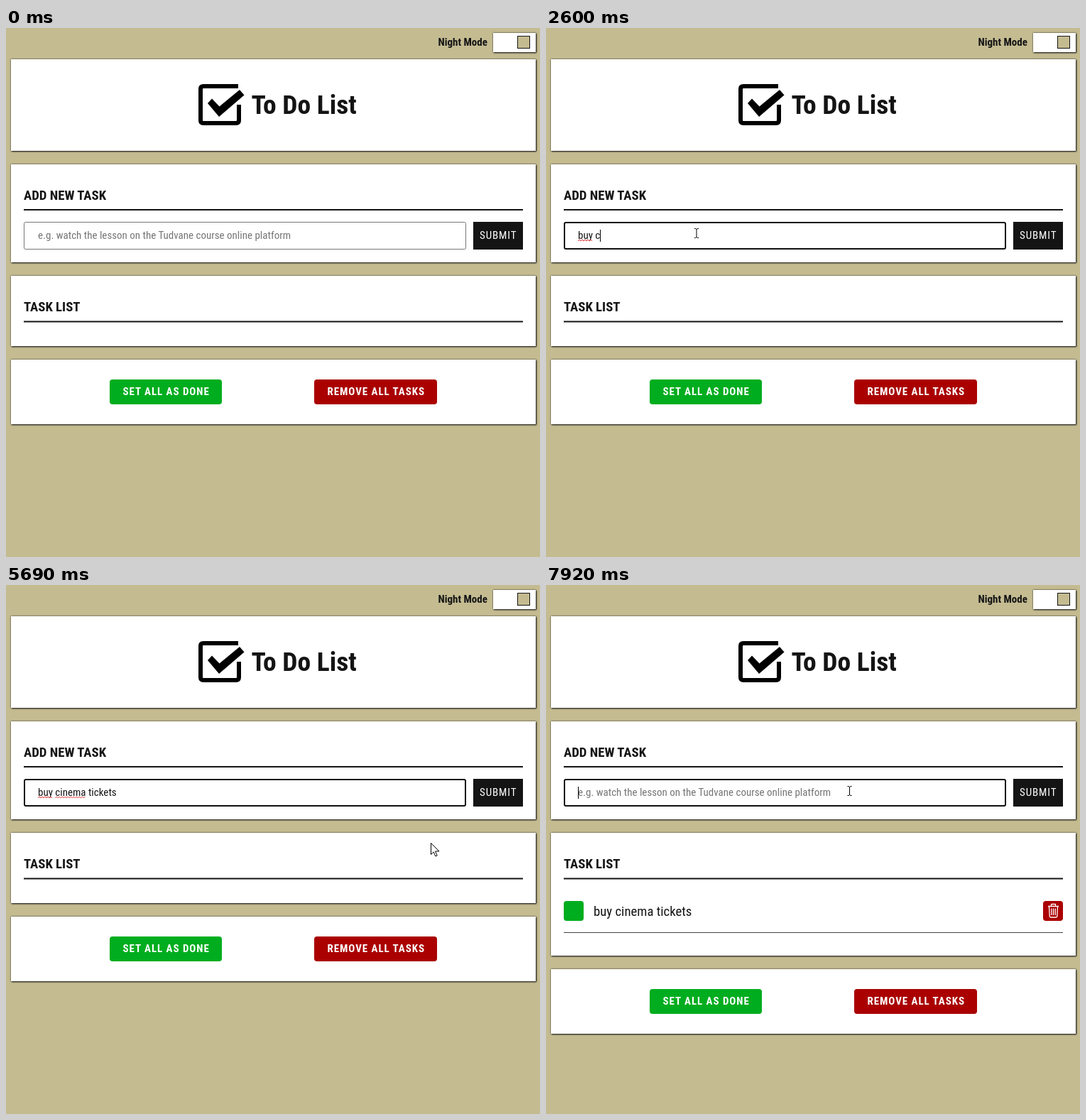
An HTML page that plays this animation: 752 px wide and 745 px high, repeating every 8 s.

```html
<!DOCTYPE html>
<html lang="en">
<head>
<meta charset="utf-8">
<title>To Do List</title>
<style>
  html, body { margin: 0; width: 100%; height: 100%; overflow: hidden; background: #c4bb91; }
  .card {
    position: absolute; left: 7px; width: 739px; background: #fff;
    box-shadow: 0 0 2px #141414cc, 1px 1px 2px #141414;
  }
  svg { position: absolute; left: 0; top: 0; }
  text {
    font: 15px "Roboto Condensed", Roboto, "Liberation Sans", sans-serif;
    font-stretch: 75%; fill: #141414; white-space: pre;
  }
  .bold { font-weight: 700; }
  .h1 { font-size: 37.5px; font-weight: 700; }
  .h2 { font-size: 18.75px; font-weight: 700; }
  .task { font-size: 18.75px; }
  .hint { fill: #757575; }
  .button { font-weight: 700; letter-spacing: .94px; fill: #fff; }
  .submit { letter-spacing: .9px; fill: #fff; }
  .submit.dark { font-weight: 700; fill: #141414; }
</style>
</head>
<body>
<div class="card" style="left:686px;width:60px;top:7px;height:27px"></div>
<div class="card" style="top:44px;height:129px"></div>
<div class="card" style="top:192px;height:138px"></div>
<div class="card" id="listCard" style="top:349px;height:99px"></div>
<div class="card" id="actionCard" style="top:467px;height:91px"></div>

<svg width="752" height="745" viewBox="0 0 752 745">
  <text class="bold" x="608.5" y="25">Night Mode</text>
  <rect x="720.5" y="11.5" width="17" height="17" fill="#c4bb91" stroke="#141414"/>

  <path d="M327 82H278q-4 0-4 4v44q0 4 4 4h46q4 0 4-4V108" fill="none" stroke="#000" stroke-width="6"/>
  <path d="M284 106l6-6.5 10.500 11L329 87l6.500 7.500L300 125z"/>
  <text class="h1" x="345.500" y="121">To Do List</text>

  <text class="h2" x="25" y="241.500">ADD NEW TASK</text>
  <path d="M25 256H728M25 413.500H728" stroke="#141414" stroke-width="2"/>
  <text class="h2" x="25" y="399">TASK LIST</text>

  <rect id="field" fill="#fff"/>
  <text class="hint" id="hint" x="45" y="297">e.g. watch the lesson on the Tudvane course online platform</text>
  <text id="typed" x="45" y="297"></text>
  <path id="squiggles" fill="none" stroke="#e03030"/>
  <rect id="caret" y="284" width="1" height="17" fill="#000"/>

  <g id="submitNormal">
    <rect x="658" y="273" width="70" height="39" fill="#141414"/>
    <text class="submit" x="667" y="297">SUBMIT</text>
  </g>
  <g id="submitHover">
    <rect id="submitBox" x="657.500" y="273.500" width="70" height="38" fill="#fff" stroke="#141414"/>
    <text class="submit dark" x="665" y="297">SUBMIT</text>
  </g>

  <g id="taskRow">
    <rect x="25" y="445" width="28" height="28" rx="4" fill="#00ad1f"/>
    <text class="task" x="67" y="465.500">buy cinema tickets</text>
    <rect x="700" y="445" width="28" height="28" rx="4" fill="#aa0000"/>
    <path d="M707 452.500H722M711.500 452v-2q0-.5.500-.5h5q.500 0 .500.500v2M708.500 453l.700 13.500q.100 1.500 1.500 1.500h7.600q1.400 0 1.500-1.500l.700-13.500M711.800 455.500v9.500M714.500 455.500v9.500M717.200 455.500v9.500"
      fill="none" stroke="#fff" stroke-width="1.300"/>
    <path d="M25 489.500H728" stroke="#444"/>
  </g>

  <g id="actions">
    <rect x="146" y="495" width="158" height="35" rx="4" fill="#00ad1f"/>
    <text class="button" x="164.500" y="517">SET ALL AS DONE</text>
    <rect x="434" y="495" width="173" height="35" rx="4" fill="#aa0000"/>
    <text class="button" x="452.500" y="517">REMOVE ALL TASKS</text>
  </g>

  <circle id="click" r="11.500" fill="#fff000" opacity=".6"/>
  <g id="pointer">
    <path id="arrow" d="M.500.500V16.500l3.700-3.500 2.600 6 2.400-1-2.600-6h5.400z" fill="#fff" stroke="#000"/>
    <path id="ibeam" d="M-3-6.500H-1.500L0-5.500 1.500-6.500H3M0-5.500V5.500M-3 6.500H-1.500L0 5.500 1.500 6.500H3" fill="none" stroke="#000"/>
    <path id="hand" d="M-1.500 12V1.200a1.600 1.600 0 0 1 3.200 0V7.500q1.400-1 3 .400 1.600-.8 2.800.700 2.800-.3 2.800 2V14q0 3-2 5v2.500H1.500V19.500L-5 12.500q-.3-2 2-1.500zM1.700 7.500v4M4.700 8v3.500M7.500 8.700v3"
      fill="#fff" stroke="#141414" stroke-width="1.100"/>
  </g>
</svg>

<script>
const LOOP = 8000;
const TASK = "buy cinema tickets";
const $ = id => document.getElementById(id);

// Step tables: [start time in ms, value, ...], each held until the next row.
const typedSteps = [
  [0, 0], [1660, 1], [1940, 2], [2210, 3], [2330, 4], [2600, 5], [2710, 6],
  [2980, 7], [3360, 8], [3480, 9], [3610, 10], [3730, 11], [3870, 12],
  [3990, 13], [4250, 15], [4390, 16], [4650, 17], [4780, 18], [6850, 0]
];
const caretSteps = [
  [0, false], [880, true], [1400, false], [1660, true], [5330, false],
  [5830, true], [6330, false], [6850, true], [7380, false], [7920, true]
];
const focusSteps = [[0, false], [880, true], [6330, false], [6850, true]];
const submitSteps = [[0, "normal"], [6080, "hover"], [6330, "pressed"], [6850, "hover"], [6990, "normal"]];
const clickSteps = [[0, false], [880, true], [990, false], [6330, true], [6850, false]];
const pointerSteps = [
  [0, "none", 0, 0],
  [130, "arrow", 646, 695], [250, "arrow", 560, 560], [370, "arrow", 420, 430],
  [490, "arrow", 300, 340], [620, "ibeam", 224, 296], [760, "ibeam", 214, 290],
  [880, "ibeam", 212, 289],
  [5330, "ibeam", 250, 289], [5450, "arrow", 370, 316], [5570, "arrow", 500, 348],
  [5690, "arrow", 598, 363], [5830, "arrow", 642, 339], [5960, "arrow", 668, 318],
  [6080, "hand", 685, 300], [6210, "hand", 688.5, 296],
  [6990, "ibeam", 623, 300], [7130, "ibeam", 530, 298], [7240, "ibeam", 445, 292],
  [7380, "ibeam", 429, 290], [7630, "ibeam", 427.5, 290]
];

const at = (steps, t) => steps.findLast(step => step[0] <= t).slice(1);
const show = (id, visible) => $(id).setAttribute("visibility", visible ? "visible" : "hidden");
const set = (id, attributes) => {
  for (const name in attributes) $(id).setAttribute(name, attributes[name]);
};

function squiggle(from, to) {
  let path = `M${from} 300`;
  for (let x = from + 2, up = true; x <= to; x += 2, up = !up) path += `L${x} ${up ? 298 : 300}`;
  return path;
}

function drawField(t, hovered) {
  const [count] = at(typedSteps, t);
  const [focused] = at(focusSteps, t);
  const typed = $("typed");
  const value = TASK.slice(0, count);
  if (typed.textContent !== value) typed.textContent = value;
  const widthOf = length => length ? typed.getSubStringLength(0, length) : 0;

  const inset = focused ? 1 : .5;
  set("field", {
    x: 25 + inset, y: 273 + inset,
    width: (hovered ? 622 : 623) - 2 * inset, height: 39 - 2 * inset,
    rx: 2, stroke: focused ? "#101010" : "#767676", "stroke-width": 2 * inset
  });
  show("hint", !count);
  show("caret", at(caretSteps, t)[0]);
  set("caret", { x: Math.round(45 + widthOf(count)) });

  const finished = focused ? [...value.matchAll(/\w+(?= )/g)] : [];
  set("squiggles", {
    d: finished.map(({ index, 0: word }) =>
      squiggle(45 + widthOf(index), 45 + widthOf(index + word.length))).join("")
  });
}

function drawSubmit(state) {
  const pressed = state === "pressed";
  show("submitNormal", state === "normal");
  show("submitHover", state !== "normal");
  set("submitHover", { transform: pressed ? "translate(692 292.5) scale(.9) translate(-692.5 -292.5)" : "" });
  set("submitBox", { rx: pressed ? 3 : 0, "stroke-width": pressed ? 2 : 1 });
}

function drawList(added) {
  const shift = added ? 74 : 0;
  $("listCard").style.height = 99 + shift + "px";
  $("actionCard").style.top = 467 + shift + "px";
  set("actions", { transform: `translate(0 ${shift})` });
  show("taskRow", added);
}

function drawPointer(t) {
  const [kind, x, y] = at(pointerSteps, t);
  for (const id of ["arrow", "ibeam", "hand"]) show(id, id === kind);
  set("pointer", { transform: `translate(${x} ${y})` });
  show("click", at(clickSteps, t)[0]);
  set("click", { cx: x + .5, cy: y });
}

function render(t) {
  const [submit] = at(submitSteps, t);
  drawField(t, submit !== "normal");
  drawSubmit(submit);
  drawList(t >= 6850);
  drawPointer(t);
}

const start = performance.now();
function tick() {
  render((performance.now() - start) % LOOP);
  requestAnimationFrame(tick);
}
tick();
</script>
</body>
</html>
```
